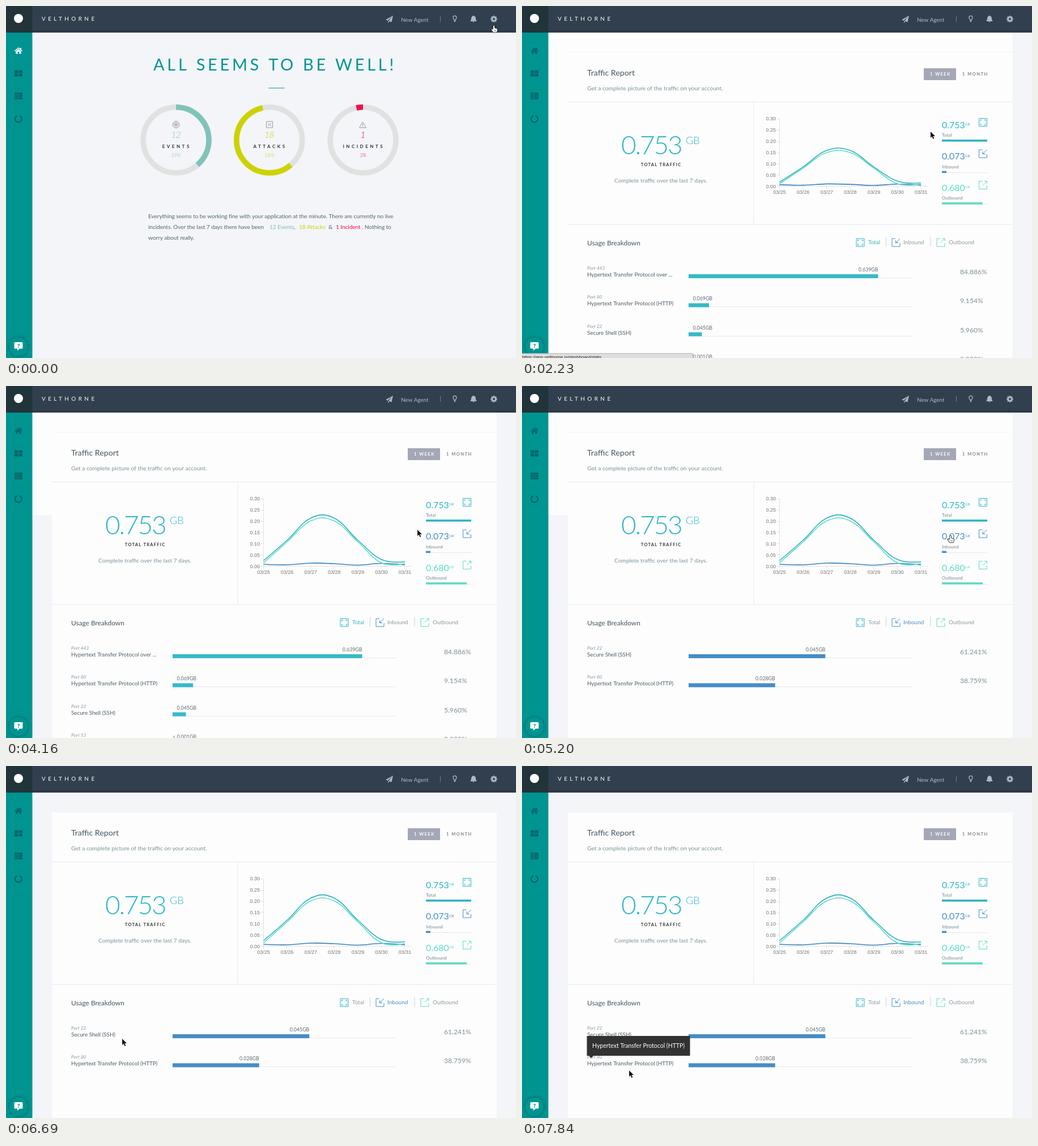
An HTML page with a canvas that plays this animation: 900 px wide and 622 px high, repeating every 7.99 s.

```html
<!DOCTYPE html>
<html lang="en">
<head>
<meta charset="utf-8">
<title>Traffic report</title>
<style>
html, body { margin: 0; width: 100%; height: 100%; overflow: hidden; background: #f3f5f9; }
canvas { display: block; }
</style>
</head>
<body>
<canvas id="stage" width="900" height="622"></canvas>
<script>
const ctx = document.getElementById('stage').getContext('2d');
const LOOP = 7990, REPORT = 1940, STEP = 144;
const TOTAL = '#2fb6c4', INBOUND = '#468dc6', OUTBOUND = '#5bdcc4';
const TEAL = '#009491', HEADER = '#323f4e', SLATE = '#44565f', GREY = '#7d9298', RULE = '#e8eaed';

// time, x, y, hand?
const POINTER = [
  [0, 862, 42, 1], [140, 862, 34, 1], [320, 861, 23, 1], [755, 860, 32, 0], [900, 846, 66, 0],
  [1050, 806, 138, 1], [1190, 760, 196, 1], [1340, 730, 224, 1], [1490, 723, 228, 1],
  [1940, 723, 228, 1], [2086, 721, 222, 0], [4160, 726, 254, 0], [4310, 738, 288, 0],
  [4460, 752, 291, 1], [4600, 757, 280, 1], [4750, 757, 272, 1], [6100, 757, 277, 1],
  [6250, 560, 385, 0], [6400, 318, 475, 0], [6690, 205, 482, 0], [6860, 170, 488, 0],
  [7020, 164, 498, 0], [7190, 165, 507, 0], [7360, 168, 519, 0], [7550, 171, 527, 0], [7840, 189, 538, 0]
];

function text(s, x, y, size, color, { weight = 400, italic = '', gap = 0, align = 'left', family = 'Lato' } = {}) {
  ctx.font = `${italic} ${weight} ${size}px ${family}, sans-serif`;
  ctx.letterSpacing = gap + 'px';
  ctx.textAlign = align;
  ctx.fillStyle = color;
  ctx.fillText(s, x + (align === 'center' ? gap / 2 : 0), y);
}
function rect(x, y, w, h, color) {
  ctx.fillStyle = color;
  ctx.fillRect(x, y, w, h);
}
function circle(x, y, r, color) {
  ctx.beginPath();
  ctx.arc(x, y, r, 0, 7);
  ctx.fillStyle = color;
  ctx.fill();
}
function arc(x, y, r, from, to, width, color) {
  ctx.beginPath();
  ctx.arc(x, y, r, (from - .25) * 2 * Math.PI, (to - .25) * 2 * Math.PI);
  ctx.lineWidth = width;
  ctx.strokeStyle = color;
  ctx.stroke();
}
function icon(d, x, y, fill, stroke, width = 1) {
  const path = new Path2D(d);
  ctx.save();
  ctx.translate(x, y);
  ctx.lineWidth = width;
  ctx.lineJoin = 'round';
  if (stroke) { ctx.strokeStyle = stroke; ctx.stroke(path); }
  if (fill) { ctx.fillStyle = fill; ctx.fill(path); }
  ctx.restore();
}

function frameChrome(onReport) {
  const light = '#a9bcc5', dark = '#05666a';
  rect(0, 40, 46.5, 600, TEAL);
  rect(0, -10, 900, 57, HEADER);
  rect(46, 43, 854, 4, '#2e3a48');
  rect(0, -10, 46.5, 57, '#20343a');
  circle(22, 22, 8, '#fff');
  text('VELTHORNE', 63, 26, 10, '#fff', { gap: 4.4 });
  icon('M6 -6L-7 1.2L-3.4 2.8L4 -4L-1.8 3.6L3.4 5.6ZM-3 3.5V7L-.6 4.6Z', 677, 23, light);
  text('New Agent', 697, 28, 9.8, light);
  rect(766, 18, 1, 10, '#71818c');
  icon('M-1.4 2.2C-1.4 .8 -3 0 -3 -2.2A3 3 0 0 1 3 -2.2C3 0 1.4 .8 1.4 2.2ZM-1.4 4H1.4M-.8 5.2H.8', 792, 22.5, null, light, 1.3);
  icon('M-6 4C-3.6 2 -4.4 -1 -3.6 -3Q-2.8 -5 -.8 -5.4A.8 .8 0 0 1 .8 -5.4Q2.8 -5 3.6 -3C4.4 -1 3.6 2 6 4ZM-1.6 4.6H1.6Q0 7.4 -1.6 4.6Z', 825, 23, light);
  for (let i = 0; i < 4; i++) {
    ctx.save();
    ctx.translate(861, 23);
    ctx.rotate(i * Math.PI / 4);
    rect(-1.3, -5.8, 2.6, 11.6, light);
    ctx.restore();
  }
  circle(861, 23, 4.4, light);
  circle(861, 23, 1.9, HEADER);

  icon('M0 -6L7 .3L6 1.3L0 -4L-6 1.3L-7 .3ZM3 -5H5V-1L3 -3ZM0 -3L4.8 1.2V5.5H1.3V2H-1.3V5.5H-4.8V1.2Z', 22, 79, onReport ? dark : '#fff');
  for (const x of [15, 22.5]) for (const y of [113.5, 119.5]) rect(x, y, 6.5, 5, dark);
  for (let i = 0; i < 3; i++) {
    rect(15, 153 + i * 4.2, 14, 3.5, dark);
    rect(16, 154.3 + i * 4.2, 8, .8, '#1d8583');
  }
  arc(22, 199.5, 6, .06, .94, 2.2, dark);

  ctx.save();
  ctx.shadowColor = 'rgba(0,40,40,.5)';
  ctx.shadowBlur = 5;
  circle(22, 602, 16.5, TEAL);
  ctx.restore();
  icon('M-6 -7H6Q7.5 -7 7.5 -5.5V3Q7.5 4.5 6 4.5H2L-2 8V4.5H-6Q-7.5 4.5 -7.5 3V-5.5Q-7.5 -7 -6 -7Z', 22, 601, '#fff');
  text('?', 22, 603.5, 10, TEAL, { weight: 900, align: 'center' });
}

function gauge(x, from, to, color, count, label, percent) {
  arc(x, 236.8, 58, 0, 1, 9.6, '#e1e1e1');
  arc(x, 236.8, 58, from, to, 9.6, color);
  text(count, x, 233, 16, color, { weight: 300, italic: 'italic', gap: -1, align: 'center' });
  text(label, x - .5, 251.3, 8, '#333', { weight: 700, gap: 3.5, align: 'center' });
  text(percent, x, 267, 9, color, { weight: 300, italic: 'italic', align: 'center' });
}

function dashboard() {
  const body = '#55686e', mint = '#7cc0b7', lime = '#cdd200', red = '#f30d4b', line = '#999';
  text('ALL SEEMS TO BE WELL!', 260, 114, 29, TEAL, { gap: 4.7 });
  rect(463.5, 144.5, 28, 1, TEAL);
  gauge(300, 0, 12 / 31, '#80c3ba', '12', 'EVENTS', '39%');
  gauge(464.8, 12 / 31, 30 / 31, lime, '18', 'ATTACKS', '58%');
  gauge(630, 30 / 31, 1, red, '1', 'INCIDENTS', '3%');
  arc(300, 209.5, 6, 0, 1, 1, line);
  arc(300, 209.5, 3.7, 0, 1, 1, line);
  circle(300, 209.5, 1.8, line);
  icon('M-5.5 -5.5H5.5V5.5H-5.5ZM-3 -3L3 3M3 -3L-3 3', 465, 209.5, null, line);
  icon('M0 -5L6 5H-6ZM0 -2V2M0 3V4', 629.5, 210, null, line);
  const put = (s, x, y, color = body) => text(s, x, y, 10.2, color, { gap: -.11 });
  put('Everything seems to be working fine with your application at the minute. There are currently no live', 251, 375);
  put('incidents. Over the last 7 days there have been', 251, 394);
  put('12 Events', 465, 394, mint);
  put(',', 508, 394);
  put('18 Attacks', 517, 394, lime);
  put('&', 569, 394);
  put('1 Incident', 582, 394, red);
  put('. Nothing to', 628, 394);
  put('worry about really.', 251, 413);
}

function dropdown() {
  rect(645.5, 47, 211, 290.5, '#ccd1d7');
  rect(646.5, 47, 209, 156.5, '#fff');
  rect(646.5, 204, 209, 132.5, '#f4f5f9');
  icon('M-5 5L0 0L5 5Z', 845, 42, '#fff');
  for (const y of [124, 203, 237]) rect(646, y, 210, 1, '#dcdfe4');
  text('Tarn Welkov', 659, 71, 12, '#222');
  text('tarn@velthorne.io', 659, 88.5, 11.8, '#4ab5a8');
  text('2 Factor Disabled', 659, 107, 10.4, '#cbcdd0');
  text('1.055GB used out of 45GB space', 659, 148.5, 10.5, '#333');
  rect(659, 159, 184, 11, '#ececec');
  rect(659, 159, 4, 11, '#008b87');
  text('Upgrade Plan', 659, 187, 10.5, TEAL);
  ['Traffic Report', 'Settings', 'Documentation', 'Logout'].forEach((s, i) =>
    text(s, 659, 224.5 + i * 33.3, 9.8, '#3f5058'));
}

function statusBar() {
  rect(0, 613.5, 302, 9, '#b4b4b4');
  rect(0, 614.5, 301, 8, '#dedede');
  text('https://app.velthorne.io/dashboard/stats', 0, 622.7, 8, '#222', { family: 'Liberation Sans' });
}

const FLOW_ICONS = [
  ['M-7 -7H7V7H-7ZM-4.5 -2V-4.5H-2M2 -4.5H4.5V-2M4.5 2V4.5H2M-2 4.5H-4.5V2', TOTAL],
  ['M-1 -7H-7V7H7V1M7 -7L0 0M-.5 -4V.5H4', INBOUND],
  ['M-1 -7H-7V7H7V1M0 0L7 -7M2.5 -7H7V-2.5', OUTBOUND]
];
const flowIcon = (i, x, y) => icon(FLOW_ICONS[i][0], x, y, null, FLOW_ICONS[i][1]);

function curve(heights, grow, color) {
  const px = i => 454.5 + i * 41.6;
  const py = i => 318.5 - heights[i] * grow;
  const slope = i => i > 0 && i < 6 ? (py(i + 1) - py(i - 1)) * .2 : 0;
  ctx.beginPath();
  ctx.moveTo(px(0), py(0));
  for (let i = 1; i < 7; i++) {
    // end points keep their own position as control point
    const ax = px(i - 1) + (i > 1 ? 16.6 : 0), bx = px(i) - (i < 6 ? 16.6 : 0);
    ctx.bezierCurveTo(ax, py(i - 1) + slope(i - 1), bx, py(i) - slope(i), px(i), py(i));
  }
  ctx.lineWidth = 1.6;
  ctx.strokeStyle = color;
  ctx.stroke();
}

function chart(grow) {
  const label = { family: 'Liberation Sans' };
  rect(454, 199, 1, 124, '#dfe1e4');
  rect(450, 318, 266, 1, '#dfe1e4');
  for (let i = 0; i < 7; i++) {
    const y = 318.5 - i * 19.85, x = 454 + i * 41.6;
    rect(450, Math.floor(y), 4, 1, '#dfe1e4');
    rect(Math.floor(x), 318, 1, 5, '#dfe1e4');
    text((i * .05).toFixed(2), 448, y + 3, 9, '#777', { ...label, align: 'right' });
    text('03/' + (25 + i), x + .5, 332, 9, '#777', { ...label, align: 'center' });
  }
  curve([10, 46, 85, 85, 46, 12, 8], grow, '#28b0be');
  curve([3.5, 2.5, 5.5, 4.5, 2, 5, 2.5], grow, '#3a84bf');
  curve([6, 43, 80, 80, 43, 6, 5], grow, OUTBOUND);
}

function usageRow(i, port, name, amount, percent, color) {
  const y = i * 51.3, end = 294 + 3.94 * percent;
  text('Port ' + port, 115, 466 + y, 8.4, '#8b979b', { italic: 'italic' });
  text(name, 115, 478 + y, 9.8, '#4c5d64');
  rect(294, 480 + Math.round(y), 394, 1, '#e6e8eb');
  rect(294, 474 + y, end - 294, 7, color);
  text(amount, Math.max(end, 336), 469 + y, 8.8, '#5e6a6f', { align: 'right' });
  text(percent.toFixed(3) + '%', 773, 474 + y, 12.1, GREY);
}

function report(t) {
  const inbound = t >= 5200;
  const PAPER = '#fdfdfe';
  if (t < 6690) {
    rect(46, 47, 820, 35, PAPER);
    rect(46, 47, 35, t < 2520 ? 575 : 181, PAPER);
  }
  rect(81, 82, 785, 560, PAPER);
  if (t < 6690) rect(81, 81, 785, 1, '#f3f4f7');
  rect(81, 169, 785, 1, RULE);
  rect(81, 385.5, 785, 1, RULE);
  rect(408.5, 170, 1, 216, RULE);

  text('Traffic Report', 115, 123, 14.2, SLATE);
  text('Get a complete picture of the traffic on your account.', 115, 149, 10.3, GREY);
  rect(709, 110, 57, 21, '#a4a7b5');
  text('1 WEEK', 720, 123, 7.5, '#fff', { weight: 700, gap: 1.5 });
  text('1 MONTH', 777, 123, 7.5, '#7f888e', { weight: 700, gap: 1.5 });

  text('0.753', 175, 262, 46, TOTAL, { weight: 300, gap: -2.2 });
  text('GB', 289, 244, 18, TOTAL, { weight: 300 });
  text('TOTAL TRAFFIC', 245, 283, 7.5, '#333', { weight: 700, gap: 1.25, align: 'center' });
  text('Complete traffic over the last 7 days.', 245, 311.5, 10.2, GREY, { align: 'center' });

  const progress = Math.min(1, Math.floor((t - REPORT) / STEP) * STEP / 1000);
  chart(1 - (1 - progress) ** 4);

  [['0.753', 'Total', 80, TOTAL], ['0.073', 'Inbound', 8, INBOUND], ['0.680', 'Outbound', 72, OUTBOUND]].forEach(([n, s, w, c], i) => {
    const y = i * 55.5;
    text(n, 741, 215.5 + y, 16, c);
    text('GB', 782, 211 + y, 6, c);
    text(s, 741, 231.3 + y, 8.2, '#76868c');
    rect(741, 239 + Math.floor(y), 80, 1, '#e3e6e9');
    rect(741, 236 + y, w, 3.5, c);
    flowIcon(i, 813.5, 205.5 + y);
  });

  text('Usage Breakdown', 115, 423, 11.9, SLATE);
  const active = inbound ? 1 : 0;
  [['Total', 597, 611], ['Inbound', 660, 673], ['Outbound', 739, 753]].forEach(([s, ix, x], i) => {
    flowIcon(i, ix, 418);
    text(s, x, 420.5, 10, i === active ? FLOW_ICONS[i][1] : '#8b9a9f');
  });
  rect(642, 408, 1, 17, '#ccd1d5');
  rect(720.5, 408, 1, 17, '#ccd1d5');

  const http = 'Hypertext Transfer Protocol (HTTP)', ssh = 'Secure Shell (SSH)';
  const rows = inbound
    ? [[22, ssh, '0.045GB', 61.241], [80, http, '0.028GB', 38.759]]
    : [[443, 'Hypertext Transfer Protocol over ...', '0.639GB', 84.886], [80, http, '0.069GB', 9.154],
       [22, ssh, '0.045GB', 5.96], [53, 'Domain Name System (DNS)', '< 0.001GB', 0]];
  rows.forEach((row, i) => usageRow(i, ...row, inbound ? INBOUND : '#36bac8'));

  if (t >= 7360) tooltip(477, 182, 35, [http]);
  else if (t >= 6860) tooltip(394.5, 211, 66, [ssh + ' — used for secure', 'logins, file transfers (scp, sftp) and port', 'forwarding']);
}

function tooltip(y, w, h, lines) {
  rect(114.5, y, w, h, '#323232');
  icon('M-4 0H4L0 4Z', 122, y + h, '#323232');
  lines.forEach((s, i) => text(s, 124, y + 21.3 + i * 15.6, 10.5, '#fff'));
}

function pointer(x, y, hand) {
  if (hand) {
    icon('M-2 -6q1.2 -1 2 0v4l4 1q1.5 .5 1 2.5l-1 4h-6l-3.5 -5q0 -1.5 1.5 -.5l1.5 1z', x, y - 1, '#fff', '#111', 1.6);
    icon('M0 1V4M2 1V4', x, y - 1, null, '#444', .7);
  } else {
    icon('M0 0v11l2.6 -2.4 1.9 4.3 1.8 -.8 -1.9 -4.1h3.6z', x, y, '#111', '#fff', 1.4);
  }
}

function draw(t) {
  const onReport = t >= REPORT;
  const [, x, y, hand] = POINTER.findLast(p => p[0] <= t);
  rect(0, 0, 900, 622, '#f3f5f9');
  ctx.save();
  if (t >= 7020 && t < 7190) ctx.translate(0, 2);
  if (onReport) report(t); else dashboard();
  frameChrome(onReport);
  if (!onReport && t >= 610) dropdown();
  ctx.restore();
  if (t >= 1340 && t < 2670) statusBar();
  pointer(x, y, hand);
}

function tick() {
  draw(performance.now() % LOOP);
  requestAnimationFrame(tick);
}
tick();
</script>
</body>
</html>
```
